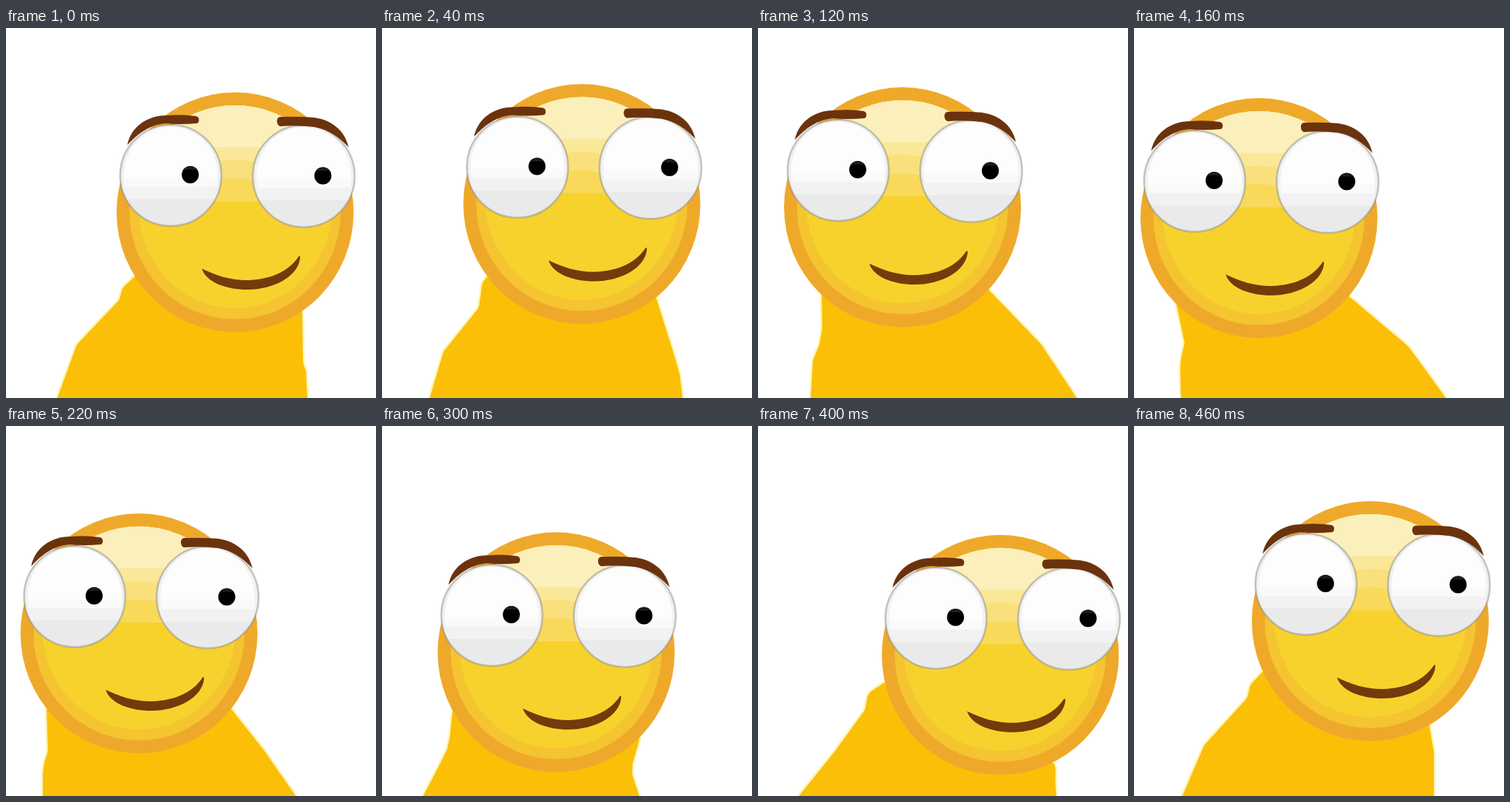
An HTML page with a canvas for the animation above (0.48 s loop, 512 by 512 pixels).

```html
<!DOCTYPE html>
<html lang="en">
<head>
<meta charset="utf-8">
<title>Swaying smiley</title>
<style>
html, body { margin: 0; width: 100%; height: 100%; overflow: hidden; background: #fff; }
canvas { display: block; width: 100vw; height: 100vh; }
</style>
</head>
<body>
<canvas id="stage" width="512" height="512"></canvas>
<script>
const ctx = document.getElementById('stage').getContext('2d');
const LOOP = 480, STEP = 20;

// time, head centre x, y
const HEAD = [
  [0, 317, 255], [40, 276.5, 243.5], [80, 237, 239.5], [120, 200, 248],
  [170, 170, 267], [220, 184, 287], [300, 241, 313], [340, 293, 331],
  [380, 328, 328], [420, 337, 302], [460, 327, 270]
];

// time, left neck (from head centre), three left points, left foot x,
// right neck (from head centre), two right points, right foot x
const BODY = [
  [0, -137, 87, 161, 360, 157, 376, 98, 438, 71, 93, 137, 411, 463, 415, 475, 417],
  [40, -130, 100, 139, 352, 134, 387, 85, 448, 66, 102, 127, 405, 455, 412, 480, 416],
  [120, -112, 117, 89, 415, 85, 438, 76, 460, 73, 118, 113, 392, 438, 408, 462, 441],
  [220, -128, 101, 58, 450, 53, 466, 51, 480, 51, 128, 105, 358, 450, 380, 482, 401],
  [300, -143, 77, 94, 430, 90, 448, 78, 472, 57, 117, 115, 347, 466, 346, 482, 356],
  [340, -156, 49, 125, 402, 121, 424, 101, 463, 53, 89, 134, 383, 478, 385, 490, 392],
  [460, -147, 68, 161, 358, 157, 376, 97, 442, 67, 81, 140, 415, 452, 415, 480, 415]
];

// Smooth periodic curve through all rows of a table
function sample(keys, t) {
  const n = keys.length;
  const row = i => keys[(i + n) % n];
  const time = i => row(i)[0] + LOOP * Math.floor(i / n);
  let i = n - 1;
  while (keys[i][0] > t) i--;
  const h = time(i + 1) - time(i), u = (t - time(i)) / h;
  const slope = (k, c) => {
    const a = time(k) - time(k - 1), b = time(k + 1) - time(k);
    const before = (row(k)[c] - row(k - 1)[c]) / a;
    const after = (row(k + 1)[c] - row(k)[c]) / b;
    return (before * b + after * a) / (a + b);
  };
  return row(i).slice(1).map((p, j) => {
    const c = j + 1, q = row(i + 1)[c], v = 1 - u;
    return v * v * (1 + 2 * u) * p + u * u * (3 - 2 * u) * q
      + h * u * v * (v * slope(i, c) - u * slope(i + 1, c));
  });
}

function ellipse(x, y, rx, ry, fill) {
  ctx.beginPath();
  ctx.ellipse(x, y, rx, ry, 0, 0, Math.PI * 2);
  if (fill) {
    ctx.fillStyle = fill;
    ctx.fill();
  }
}

function band(y, fill) {
  ctx.fillStyle = fill;
  ctx.fillRect(-180, y, 360, 360);
}

function shape(d, fill) {
  ctx.fillStyle = fill;
  ctx.fill(new Path2D(d));
}

function drawBody(b, x, y) {
  const pts = [
    [x + b[0], y + b[1]], [b[2], b[3]], [b[4], b[5]], [b[6], b[7]], [b[8], 512],
    [b[8] - 4, 530], [b[15] + 4, 530],
    [b[15], 512], [b[13], b[14]], [b[11], b[12]], [x + b[9], y + b[10]]
  ];
  ctx.beginPath();
  ctx.moveTo(x, y);
  pts.forEach((p, i) => ctx.arcTo(...p, ...(pts[i + 1] || [x, y]), 14));
  ctx.closePath();
  ctx.lineJoin = 'round';
  ctx.lineWidth = 5;
  ctx.strokeStyle = '#fdf5b4';
  ctx.stroke();
  ctx.fillStyle = '#fbbf07';
  ctx.fill();
}

function drawFace() {
  ellipse(0, 0, 164, 166, '#efa92a');
  ctx.save();
  ellipse(0, 0, 146, 148, '#f5c431');
  ctx.clip();
  ellipse(0, -8, 134, 141, '#f7d22c');
  ctx.fillStyle = '#f8d95a';
  ctx.fillRect(-150, -150, 300, 135);
  shape('M-150-150H150V-42H30Q0-52-30-42H-150Z', '#f9e07c');
  shape('M-150-150H150V-70H25Q0-75-25-70H-150Z', '#fae898');
  ctx.fillStyle = '#fbefbb';
  ctx.fillRect(-150, -150, 300, 60);
  ctx.restore();
}

function drawEye(x, y, r, px, py) {
  ctx.save();
  ellipse(x, y, r, r, '#f1f1f1');
  ctx.clip();
  ctx.save();
  ellipse(x, y, r - 5, r - 3);
  ctx.clip();
  band(-140, '#fdfdfd');
  band(y + 3, '#fafafa');
  ctx.restore();
  band(y + 16, '#f2f2f2');
  band(y + 33, '#eaeaea');
  ctx.restore();
  ellipse(x, y, r, r);
  ctx.lineWidth = 2.6;
  ctx.strokeStyle = 'rgba(130,130,125,.45)';
  ctx.stroke();

  ctx.save();
  ellipse(px, py, 11.8, 12, '#000');
  ctx.clip();
  ctx.fillStyle = '#1c1c1c';
  ctx.fillRect(px - 12, py - 12, 24, 5);
  ctx.restore();
}

function drawHead(x, y) {
  ctx.save();
  ctx.translate(x, y);
  drawFace();
  drawEye(-89, -51, 70, -62, -52);
  drawEye(95, -50, 70.5, 121.5, -50.5);
  shape('M-149-93C-145-116-124-134-95-134Q-73-136-54-133Q-50-132-50-128Q-50-123-54-123' +
    'Q-76-121-95-123C-117-122-135-109-149-93Z', '#6b330d');
  shape('M62-132Q88-133 110-131C137-127 153-110 157-90C144-104 130-114 110-118' +
    'Q86-121 62-119Q58-121 58-126Q58-131 62-132Z', '#6b330d');
  shape('M-46 78C-27 87-8 94 17 94C52 93 76 80 88 61Q90 59 90 63' +
    'C88 88 54 107 17 107C-12 107-40 97-46 78Z', '#733a0b');
  ctx.restore();
}

function draw(now) {
  const t = Math.floor((now % LOOP) / STEP) * STEP;
  const [x, y] = sample(HEAD, t);
  ctx.fillStyle = '#fff';
  ctx.fillRect(0, 0, 512, 512);
  drawBody(sample(BODY, t), x, y);
  drawHead(x, y);
}

const start = performance.now();
function tick() {
  draw(performance.now() - start);
  requestAnimationFrame(tick);
}
tick();
</script>
</body>
</html>
```
